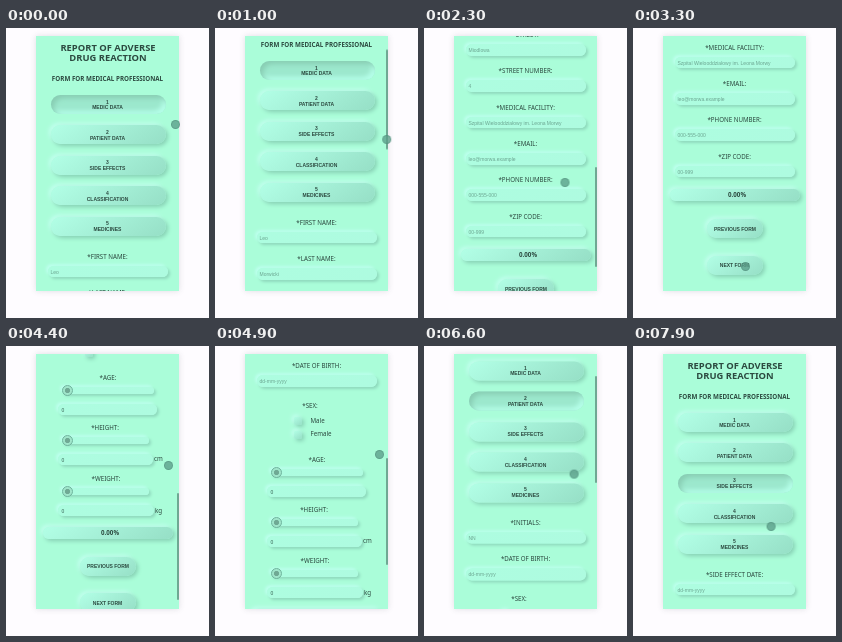
These frames come from a looping animation (203 px wide and 290 px high, 8000 ms). An HTML page:

```html
<!DOCTYPE html>
<html lang="en">
<head>
<meta charset="utf-8">
<title>Report form</title>
<style>
html, body { margin: 0; width: 100%; height: 100%; overflow: hidden; background: #fefcff; }
body { position: relative; }
#panel {
  position: absolute; left: 30px; top: 8px; width: 143px; height: 255px;
  overflow: hidden; background: #aafdd9;
}
#shade {
  position: absolute; left: 30px; top: 8px; width: 143px; height: 255px;
  box-shadow: 0 0 6px rgba(60, 60, 80, .16);
}
/* children use stage coordinates */
#scroll { position: absolute; left: -30px; top: -8px; width: 203px; height: 720px; animation: scroll 8s infinite; }
.page { position: absolute; inset: 0; background: #aafdd9; }
.page div, .page span { position: absolute; box-sizing: border-box; }
.page span { white-space: nowrap; line-height: 1; transform: translate(-50%, -50%); color: #2c4a40; }
.page .left { transform: translate(0, -50%); }

.title { font: 700 9.4px "Noto Sans", sans-serif; }
.sub { font: 600 6.25px "Noto Sans", sans-serif; }
.label { font: 500 6.2px "Noto Sans", sans-serif; }
.percent { font: 700 6.2px "Noto Sans", sans-serif; }
.cap { font: 700 5px "Liberation Sans", Arial, sans-serif; }
.hint { font: 400 5px "Liberation Sans", Arial, sans-serif; }
.page .hint { color: #6ba590; }
.page .value { font: 400 5px "Liberation Sans", Arial, sans-serif; color: #345f50; }

.raised {
  background: linear-gradient(145deg, #b2ffe6, #96dfc6);
  box-shadow: 2px 2px 4px #86cfb3, -2px -2px 4px #c4fff0;
}
.pressed {
  background: #9ce8cd;
  box-shadow: inset 3px 3px 5px #88cdb3, inset -3px -3px 5px #b6ffea;
}
.field {
  background: linear-gradient(145deg, #adfde0, #aefbe0);
  box-shadow: 2px 2px 3px #8fd9bd, -2px -2px 3px #bcffed;
}
.knob { border: 1.3px solid #6fb39c; border-radius: 50%; background: radial-gradient(#6fa994 2.2px, #a0e6cb 3px); }

#thumb {
  position: absolute; right: 0; top: 0; width: 1.7px; height: 100px;
  background: #6fa893; border-radius: 1px; animation: thumb 8s infinite, thumb-fade 8s infinite;
}
#touch {
  position: absolute; left: -4.5px; top: -4.5px; width: 9px; height: 9px; box-sizing: border-box;
  border-radius: 50%; background: rgba(92, 158, 137, .78); border: .6px solid rgba(80, 140, 122, .5);
  animation: touch 8s infinite;
}
#patient { animation: patient 8s step-end infinite; }
#effects { animation: effects 8s infinite; }

@keyframes scroll {
  0%, 8.75% { transform: translateY(0); animation-timing-function: steps(3); }
  12.5% { transform: translateY(-34px); animation-timing-function: steps(5); }
  18.75% { transform: translateY(-136px); animation-timing-function: steps(8); }
  28.75% { transform: translateY(-331px); animation-timing-function: steps(4); }
  33.75% { transform: translateY(-391px); animation-timing-function: step-end; }
  45% { transform: translateY(-346.5px); animation-timing-function: step-end; }
  53.75% { transform: translateY(-346.5px); animation-timing-function: step-end; }
  55% { transform: translateY(-327px); animation-timing-function: steps(5); }
  61.25% { transform: translateY(-245px); animation-timing-function: steps(11); }
  75% { transform: translateY(-129px); animation-timing-function: steps(10); }
  87.5%, 100% { transform: translateY(0); }
}
@keyframes thumb {
  0%, 8.75% { transform: translateY(0); height: 100px; animation-timing-function: steps(3); }
  12.5% { transform: translateY(13.5px); animation-timing-function: steps(5); }
  18.75% { transform: translateY(54px); animation-timing-function: steps(8); }
  28.75% { transform: translateY(131px); animation-timing-function: steps(4); }
  33.75% { transform: translateY(154.5px); height: 100px; animation-timing-function: step-end; }
  45%, 53.75% { transform: translateY(147px); height: 107px; animation-timing-function: step-end; }
  55% { transform: translateY(139px); animation-timing-function: steps(5); }
  61.25% { transform: translateY(104px); animation-timing-function: steps(11); }
  75% { transform: translateY(55px); animation-timing-function: steps(10); }
  87.5%, 100% { transform: translateY(0); height: 107px; }
}
@keyframes thumb-fade {
  0% { opacity: 0; animation-timing-function: step-end; }
  10% { opacity: 1; animation-timing-function: step-end; }
  37.5% { opacity: 1; animation-timing-function: steps(3); }
  41.25% { opacity: 0; animation-timing-function: step-end; }
  55% { opacity: 1; animation-timing-function: step-end; }
  87.5% { opacity: 1; animation-timing-function: steps(2); }
  90%, 100% { opacity: 0; }
}
@keyframes touch {
  0%, 8.75% { transform: translate(169px, 96px); animation-timing-function: steps(4); }
  13.75% { transform: translate(172px, 116px); animation-timing-function: steps(4); }
  18.75% { transform: translate(164px, 142px); animation-timing-function: steps(8); }
  28.75% { transform: translate(140.5px, 154px); animation-timing-function: steps(4); }
  33.75% { transform: translate(130px, 185px); animation-timing-function: steps(6); }
  41.25%, 46.25% { transform: translate(112px, 238px); animation-timing-function: steps(6); }
  53.75% { transform: translate(161px, 122px); animation-timing-function: step-end; }
  55% { transform: translate(162px, 119px); animation-timing-function: steps(5); }
  61.25% { transform: translate(164px, 108px); animation-timing-function: steps(11); }
  75% { transform: translate(161px, 94px); animation-timing-function: steps(10); }
  87.5% { transform: translate(142px, 150px); animation-timing-function: steps(2); }
  90%, 93.75% { transform: translate(112px, 144px); animation-timing-function: steps(5); }
  100% { transform: translate(144px, 189px); }
}
@keyframes patient { 0% { opacity: 0; } 45%, 100% { opacity: 1; } }
@keyframes effects {
  0%, 91.25% { opacity: 0; animation-timing-function: steps(3); }
  95%, 100% { opacity: 1; }
}
</style>
</head>
<body>
<div id="shade"></div>
<div id="panel">
  <div id="scroll">
    <div class="page" id="medic"></div>
    <div class="page" id="patient"></div>
    <div class="page" id="effects"></div>
  </div>
  <div id="thumb"></div>
</div>
<div id="touch"></div>
<script>
const text = (x, y, cls, s) => `<span class="${cls}" style="left:${x}px;top:${y}px">${s}</span>`;

// box given by its left and right edges, vertical centre and height
const box = (x1, x2, y, h, cls, r = h / 2) =>
  `<div class="${cls}" style="left:${x1}px;top:${y - h / 2}px;width:${x2 - x1}px;height:${h}px;border-radius:${r}px"></div>`;

const steps = ['MEDIC DATA', 'PATIENT DATA', 'SIDE EFFECTS', 'CLASSIFICATION', 'MEDICINES'];

function header(active) {
  const buttons = steps.map((name, i) => {
    const y = 76.3 + 30.45 * i;
    return box(45, 160, y, 19, i === active ? 'pressed' : 'raised') +
      text(101.5, y - 2.8, 'cap', i + 1) + text(101.5, y + 3, 'cap', name);
  });
  return text(102, 19.5, 'title', 'REPORT OF ADVERSE') +
    text(102, 30.3, 'title', 'DRUG REACTION') +
    text(101.5, 51, 'sub', 'FORM FOR MEDICAL PROFESSIONAL') + buttons.join('');
}

const fields = list => list.map(([name, hint], i) => {
  const y = 229 + 36.35 * i;
  return text(101.5, y, 'label', `*${name}:`) + box(42, 162, y + 14.7, 11.5, 'field') +
    text(44.5, y + 15, 'hint left', hint);
}).join('');

const check = (y, name) =>
  box(79, 87, y + .5, 8, 'raised', 2) + text(95.5, y, 'label left', name);

const slider = (y, x, name, trackEnd, inputEnd, unit) =>
  text(x, y, 'label', `*${name}:`) +
  box(56, trackEnd, y + 12.2, 7, 'field') + box(55.5, 66.5, y + 12.6, 11, 'knob') +
  box(52, inputEnd, y + 31.5, 11.5, 'field') + text(55.5, y + 32, 'value left', 0) +
  text(inputEnd + 1, y + 31.5, 'label left', unit);

const footer = y =>
  box(36.5, 167, y, 12, 'raised') + text(104, y, 'percent', '0.00%') +
  box(74, 130, y + 33.8, 19, 'raised') + text(102, y + 33.8, 'cap', 'PREVIOUS FORM') +
  box(74, 130, y + 70.3, 19, 'raised') + text(101.5, y + 70.3, 'cap', 'NEXT FORM');

const fill = (id, html) => document.getElementById(id).innerHTML = html;

fill('medic', header(0) + fields([
  ['FIRST NAME', 'Leo'],
  ['LAST NAME', 'Morwicki'],
  ['CITY', 'Cracow'],
  ['STREET', 'Miodlowa'],
  ['STREET NUMBER', '4'],
  ['MEDICAL FACILITY', 'Szpital Wielooddziałowy im. Leona Morwy'],
  ['EMAIL', 'leo@morwa.example'],
  ['PHONE NUMBER', '000-555-000'],
  ['ZIP CODE', '00-999']
]) + footer(558));

fill('patient', header(1) +
  fields([['INITIALS', 'NN'], ['DATE OF BIRTH', 'dd-mm-yyyy']]) +
  text(95, 304.5, 'label', '*SEX:') + check(319.7, 'Male') + check(333.2, 'Female') +
  slider(358.8, 102, 'AGE', 148, 151, '') +
  slider(408.8, 99, 'HEIGHT', 143, 147, 'cm') +
  slider(460, 100, 'WEIGHT', 143, 148, 'kg') +
  footer(513.5));

fill('effects', header(2) + fields([['SIDE EFFECT DATE', 'dd-mm-yyyy']]));
</script>
</body>
</html>
```
